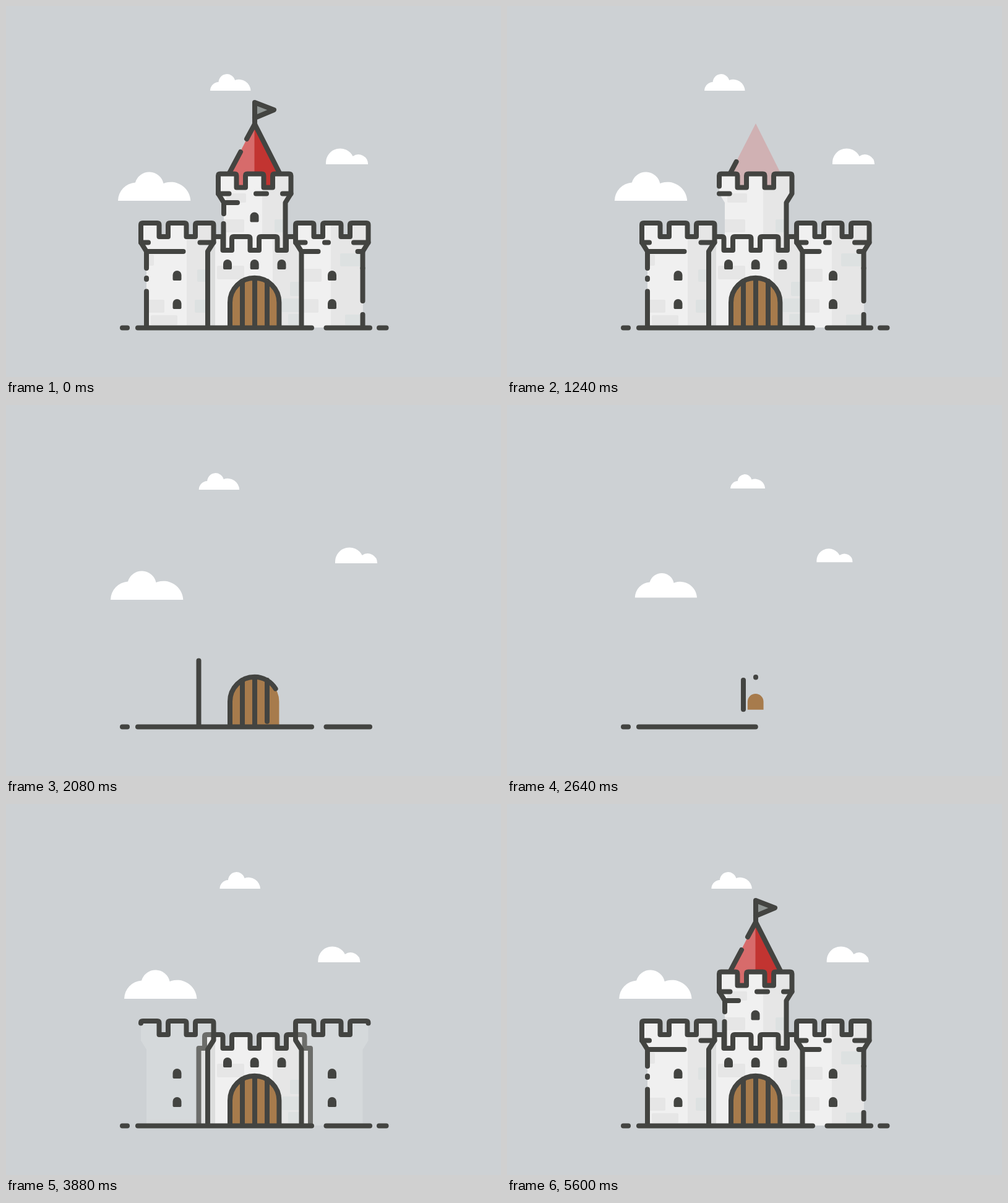
Recreate the animation shown at these times as an HTML page without scripts. Size 800 by 600 pixels, loop 5.64 s.

```html
<!DOCTYPE html>
<html lang="en">
<head>
<meta charset="utf-8">
<title>Castle</title>
<style>
/* --t: build clock, forwards then faster backwards; --s: cloud drift clock */
@property --t { syntax: "<number>"; inherits: true; initial-value: 0; }
@property --s { syntax: "<number>"; inherits: true; initial-value: 0; }
@keyframes build {
  0% { --t: 0; }
  53.19%, 70.74% { --t: 3000; }
  100% { --t: 0; }
}
@keyframes drift {
  from { --s: -3240; }
  to { --s: 2400; }
}
html, body { margin: 0; width: 100%; height: 100%; overflow: hidden; background: #cdd1d4; }
svg {
  display: block; width: 800px; height: 600px;
  animation: build 5640ms linear -3240ms infinite, drift 5640ms linear -3240ms infinite;
}
/* a step starts at --b and lasts --d on the build clock */
.k {
  --d: 200;
  --q: clamp(0, (var(--t) - var(--b)) / var(--d), 1);
  --p: calc(1 - (1 - var(--q)) * (1 - var(--q)));
}
.even { --p: var(--q); }
.line, .ground path {
  fill: none; stroke: #434441; stroke-width: 8;
  stroke-linecap: round; stroke-linejoin: round;
}
.line {
  stroke-dasharray: 1 2;
  stroke-dashoffset: calc(1px * (1 - var(--p)));
  opacity: clamp(0, var(--q) * 999, 1);
}
.fade { opacity: var(--q); }
.pop { transform: scale(var(--p)); transform-box: fill-box; transform-origin: center; }
.ground { --g: calc(427 * var(--q) * (1.5 - .5 * var(--q))); }
.ground path {
  stroke-dasharray: calc(1px * max(.01, var(--g) - var(--o))) 999px;
  opacity: clamp(0, (var(--g) - var(--o) + .1) * 99, 1);
}
.drift { transform: translateX(calc(1px * var(--s) * var(--v))); fill: #fff; }
.win { fill: #434441; }
.lit { fill: #f0f0f0; }
.dim { fill: #e6e6e6; }
.cool { fill: #dde1e1; }
</style>
</head>
<body>
<svg viewBox="0 0 800 600">
<defs>
  <path id="tower" pathLength="1" d="M326 520V397L335.5 382V354q0-3-3-3h-23.5q-3 0-3 3v19h-14.5v-19q0-3-3-3h-23.5q-3 0-3 3v19h-14.5v-19q0-3-3-3h-23.5q-3 0-3 3v28.5L227 397V424"/>
  <path id="keep" pathLength="1" d="M451.5 393V318L460.5 303.5V274.5q0-3-3-3h-23.5q-3 0-3 3v19h-14.5v-19q0-3-3-3h-23.5q-3 0-3 3v19h-14.5v-19q0-3-3-3h-23.5q-3 0-3 3v29L352 318V336"/>
  <path id="wall" pathLength="1" d="M311.5 520V395h9.5v-19q0-3 3-3h23.5q3 0 3 3v19h14.5v-19q0-3 3-3h23.5q3 0 3 3v19h14.5v-19q0-3 3-3h23.5q3 0 3 3v19h14.5v-19q0-3 3-3h23.5q3 0 3 3v19h9.5V520"/>
  <path id="arch" pathLength="1" d="M362 520V479.5a39.7 39.7 0 0 1 79.4 0V520"/>
  <path id="win" d="M-7 8V-1a7 7 0 0 1 14 0V6q0 2-2 2H-5q-2 0-2-2z"/>
  <clipPath id="inTower"><use href="#tower"/><path d="M227 396h99v124h-99z"/></clipPath>
  <clipPath id="inTower2"><use href="#tower" transform="matrix(-1 0 0 1 803.5 0)"/><path d="M477.5 396h99v124h-99z"/></clipPath>
  <clipPath id="inKeep"><use href="#keep"/><path d="M352 317h99.5v78H352z"/></clipPath>
  <clipPath id="inWall"><use href="#wall"/></clipPath>
</defs>

<!-- clouds -->
<g class="drift" style="--v:-.0088"><path class="k pop" style="--b:0;--d:390" d="M330 137a14 14 0 0 1 13.5-14a13.5 13.5 0 0 1 26.5-3a19 19 0 0 1 25.5 17z"/></g>
<g class="drift" style="--v:-.00575"><path class="k pop" style="--b:0;--d:390" d="M181 315a30 30 0 0 1 28-29.5a23.5 23.5 0 0 1 45.5 1.5a32 32 0 0 1 43.8 28z"/></g>
<g class="drift" style="--v:.0072"><path class="k pop" style="--b:0;--d:390" d="M517 256v-3a23 23 0 0 1 43.5-10a15.5 15.5 0 0 1 24.5 13z"/></g>

<!-- flag and roof -->
<path class="k fade" style="--b:2750" fill="#8f9593" d="M402 156L433 168L402 181z"/>
<path class="k fade" style="--b:2050;--d:180" fill="#d76b6b" d="M402 190L442 270L446 294H358L361 270z"/>
<path class="k fade" style="--b:2280" fill="#c23431" d="M401.5 190L442 270L446 294H401.5z"/>
<path class="k line" pathLength="1" style="--b:2500;--d:380" d="M402 190V156L433 168L402 181"/>
<path class="k line" pathLength="1" style="--b:2300;--d:250" d="M402 191L442 270"/>
<path class="k line" pathLength="1" style="--b:2050;--d:180" d="M361 270L379 236"/>
<path class="k line" pathLength="1" style="--b:2300" d="M402 191L389 215"/>

<!-- keep -->
<g class="k fade" style="--b:1800;--d:250" clip-path="url(#inKeep)">
  <path class="lit" d="M340 268h125v128H340z"/>
  <g class="dim">
    <path d="M414 268h50v128h-50z"/>
    <rect x="356" y="303" width="32" height="15" rx="2"/>
    <rect x="340" y="345" width="45" height="21" rx="2"/>
  </g>
  <rect class="cool" x="434" y="345" width="20" height="21" rx="2"/>
</g>
<use class="k line even" style="--b:1650;--d:520" href="#keep"/>
<path class="k line" pathLength="1" style="--b:1950" d="M343 303.5H360.5"/>
<path class="k line" pathLength="1" style="--b:2200" d="M404 303.5H421"/>
<path class="k line" pathLength="1" style="--b:2260" d="M460.5 303.5H447"/>
<path class="k line" pathLength="1" style="--b:2260" d="M352 318H374"/>
<path class="k line" pathLength="1" style="--b:2250;--d:180" d="M351.5 390V352"/>
<g class="win" transform="translate(401.5 341.5)"><use class="k pop" style="--b:2150;--d:240" href="#win"/></g>

<!-- wall -->
<g class="k fade" style="--b:880;--d:250" clip-path="url(#inWall)">
  <path class="lit" d="M310 370h184v150H310z"/>
  <path class="dim" d="M431 370h62v150h-62z"/>
  <path fill="#dcdddd" d="M310 397h16l10-14h2v137h-28z"/>
  <rect class="dim" x="341" y="420" width="44" height="22" rx="2"/>
  <g class="cool">
    <rect x="459" y="446" width="20" height="23" rx="2"/>
    <rect x="445" y="473" width="34" height="22" rx="2"/>
    <rect x="456" y="498" width="23" height="18" rx="2"/>
  </g>
</g>
<use class="k line even" style="--b:480;--d:560" href="#wall"/>
<g class="win">
  <g transform="translate(358 418)"><use class="k pop" style="--b:950" href="#win"/></g>
  <g transform="translate(401.7 418)"><use class="k pop" style="--b:1010" href="#win"/></g>
  <g transform="translate(445.5 418)"><use class="k pop" style="--b:1070" href="#win"/></g>
</g>

<!-- gate -->
<use class="k pop" style="--b:170;--d:400" fill="#a77b4c" href="#arch"/>
<path class="k line" pathLength="1" style="--b:100;--d:360" d="M382 445V520"/>
<path class="k line" pathLength="1" style="--b:240;--d:360" d="M402 440V520"/>
<path class="k line" pathLength="1" style="--b:340;--d:360" d="M422 445V520"/>
<use class="k line" style="--b:400;--d:400" href="#arch"/>

<!-- left tower -->
<g class="k fade" style="--b:1412;--d:295" clip-path="url(#inTower)">
  <path class="lit" d="M214 347h126v173H214z"/>
  <g class="k fade" style="--b:1640">
    <g class="dim">
      <path d="M292 347h48v173h-48z"/>
      <rect x="222" y="402" width="17" height="18" rx="2"/>
      <rect x="222" y="475" width="34" height="21" rx="2"/>
      <rect x="234" y="500" width="43" height="16" rx="2"/>
    </g>
    <rect class="cool" x="309" y="426" width="20" height="20" rx="2"/>
    <rect class="cool" x="305" y="475" width="24" height="21" rx="2"/>
  </g>
</g>
<use class="k line even" style="--b:890;--d:705" href="#tower"/>
<path class="k line" pathLength="1" style="--b:1620" d="M218 382.5H230"/>
<path class="k line" pathLength="1" style="--b:1660" d="M335.5 382.5H313.5"/>
<path class="k line" pathLength="1" style="--b:1620;--d:250" d="M227 397H286.5"/>
<path class="k line" pathLength="1" style="--b:1720;--d:60" d="M227 440V442"/>
<path class="k line" pathLength="1" style="--b:1780" d="M227 461.5V520"/>
<g class="win">
  <g transform="translate(276.5 436)"><use class="k pop" style="--b:1180" href="#win"/></g>
  <g transform="translate(276.5 482)"><use class="k pop" style="--b:1120" href="#win"/></g>
</g>

<!-- right tower -->
<g class="k fade" style="--b:1412;--d:295" clip-path="url(#inTower2)">
  <path class="lit" d="M464 347h126v173H464z"/>
  <g class="k fade" style="--b:1640">
    <g class="dim">
      <path d="M525 347h65v173h-65z"/>
      <rect x="474" y="425" width="36" height="21" rx="2"/>
      <rect x="474" y="474" width="31" height="22" rx="2"/>
    </g>
    <rect class="cool" x="540" y="400" width="40" height="21" rx="2"/>
    <rect class="cool" x="548" y="499" width="32" height="17" rx="2"/>
  </g>
</g>
<use class="k line even" style="--b:890;--d:705" href="#tower" transform="matrix(-1 0 0 1 803.5 0)"/>
<path class="k line" pathLength="1" style="--b:1590" d="M576.5 424V477"/>
<path class="k line" pathLength="1" style="--b:1780" d="M576.5 499V520"/>
<path class="k line" pathLength="1" style="--b:1620" d="M468 382.5H483.5"/>
<path class="k line" pathLength="1" style="--b:1700" d="M515 382.5H521"/>
<path class="k line" pathLength="1" style="--b:1620" d="M585.5 382.5H562"/>
<path class="k line" pathLength="1" style="--b:1660" d="M477.5 397H504.5"/>
<path class="k line" pathLength="1" style="--b:1660" d="M576.5 397H568.5"/>
<g class="win">
  <g transform="translate(527 436)"><use class="k pop" style="--b:1180" href="#win"/></g>
  <g transform="translate(527 482)"><use class="k pop" style="--b:1120" href="#win"/></g>
</g>

<g class="k ground" style="--b:0;--d:630">
  <path style="--o:0" d="M188 520.5H196"/>
  <path style="--o:25" d="M213 520.5H494"/>
  <path style="--o:329" d="M517.5 520.5H588"/>
  <path style="--o:415" d="M603 520.5H614.5"/>
</g>
</svg>
</body>
</html>
```
